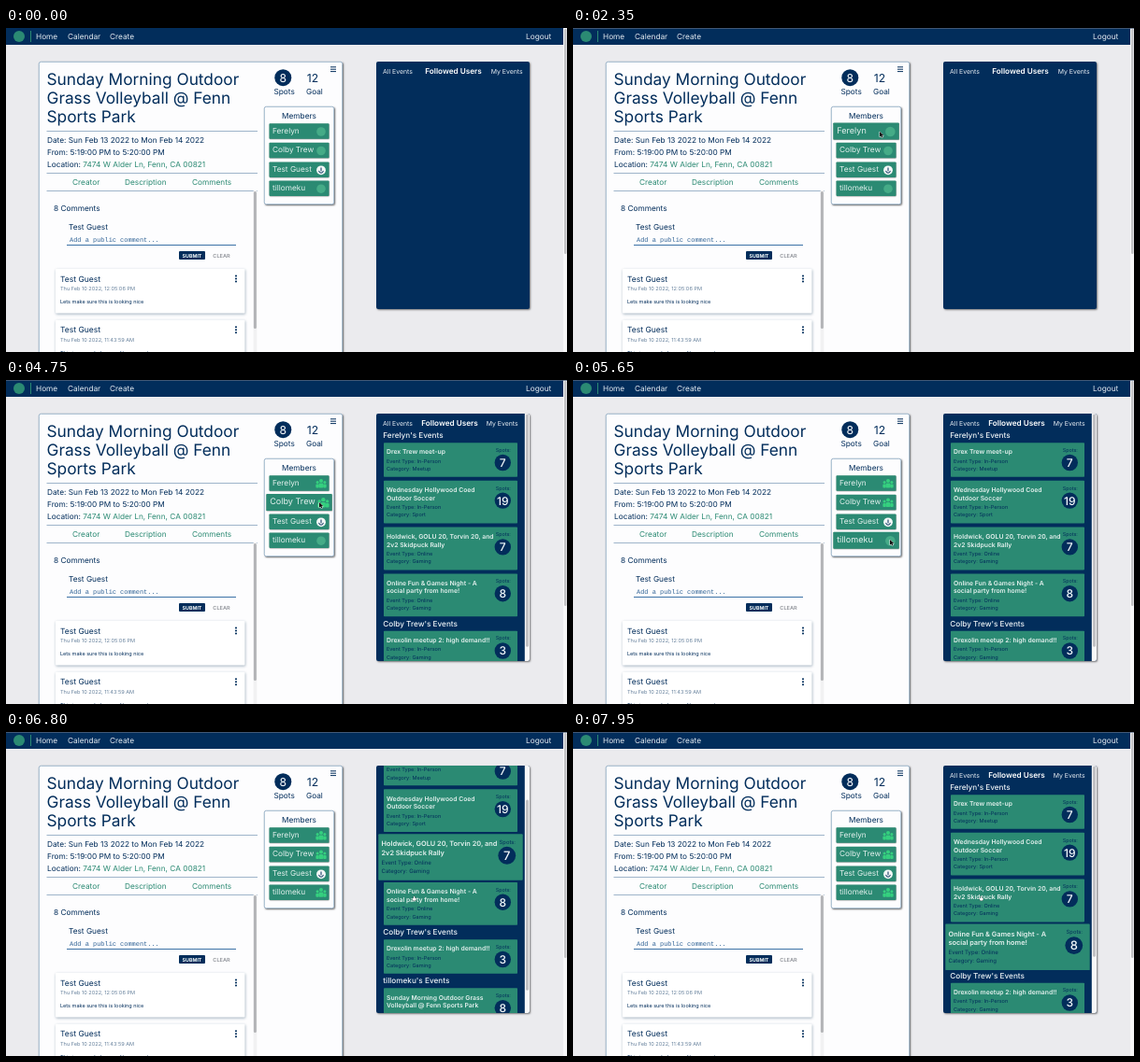
Write an HTML page with a canvas that moves like this. It is 600x347 px and loops after 8 s.

```html
<!DOCTYPE html>
<html lang="en">
<head>
<meta charset="utf-8">
<title>Event page</title>
<style>
html, body { margin: 0; width: 100%; height: 100%; overflow: hidden; background: #ebebee; }
canvas { display: block; width: 600px; height: 347px; }
</style>
</head>
<body>
<canvas id="stage"></canvas>
<script>
const W = 600, H = 347, LOOP = 8000;
const NAVY = '#022d5b', GREEN = '#2b8a73', BRIGHT = '#35d07f', PALE = '#e4f1ee';
const SANS = 'Inter, sans-serif', MONO = '"Liberation Mono", monospace';
const BASE = 8.28, SMALL = 5.57;

const canvas = document.getElementById('stage');
const ctx = canvas.getContext('2d');
const ratio = Math.max(1, window.devicePixelRatio || 1);
canvas.width = W * ratio;
canvas.height = H * ratio;
// Fractional glyph advances keep small text at its true width
ctx.textRendering = 'geometricPrecision';

const members = [
  { name: 'Ferelyn', y: 110.5, followed: 2800 },
  { name: 'Colby Trew', y: 131, followed: 4600 },
  { name: 'Test Guest', y: 151.7, self: true },
  { name: 'tillomeku', y: 171.7, followed: 5850 }
];

const card = (title, type, category, spots) => ({ title, type, category, spots });
const groups = [
  { owner: members[0], cards: [
    card(['Drex Trew meet-up'], 'In-Person', 'Meetup', 7),
    card(['Wednesday Hollywood Coed', 'Outdoor Soccer'], 'In-Person', 'Sport', 19),
    card(['Holdwick, GOLU 20, Torvin 20, and', '2v2 Skidpuck Rally'], 'Online', 'Gaming', 7),
    card(['Online Fun & Games Night - A', 'social party from home!'], 'Online', 'Gaming', 8)
  ] },
  { owner: members[1], cards: [
    card(['Drexolin meetup 2: high demand!!'], 'In-Person', 'Gaming', 3)
  ] },
  { owner: members[3], cards: [
    card(['Sunday Morning Outdoor Grass', 'Volleyball @ Fenn Sports Park'], 'In-Person', 'Sport', 8)
  ] }
];

// Keyframes: time, then values
const pointerPath = [
  [1050, 601, -6], [1650, 430, 78], [2200, 328, 111], [2450, 328, 111],
  [2700, 335, 111], [3000, 335, 111], [3600, 304, 186], [3900, 304, 186],
  [4400, 335, 131], [4850, 335, 131], [5350, 339, 171], [5950, 339, 171], [6350, 436.5, 176]
];
const scrollPath = [[6450, 0], [6800, 46.5], [7050, 77], [7550, 77], [7900, 0]];

function along(keys, t) {
  if (t <= keys[0][0]) return keys[0].slice(1);
  for (let i = 1; i < keys.length; i++) {
    const [a, ...from] = keys[i - 1], [b, ...to] = keys[i];
    if (t < b) {
      const p = (t - a) / (b - a), e = p * p * (3 - 2 * p);
      return from.map((v, k) => v + (to[k] - v) * e);
    }
  }
  return keys[keys.length - 1].slice(1);
}

// y is the middle of the capital letters
function text(str, x, y, size, color, { weight = 400, align = 'left', font = SANS } = {}) {
  ctx.font = `${weight} ${size}px ${font}`;
  ctx.fillStyle = color;
  ctx.textAlign = align;
  ctx.fillText(str, x, y + size * 0.36);
  return ctx.measureText(str).width;
}

function box(x, y, w, h, color, r = 0) {
  ctx.fillStyle = color;
  ctx.beginPath();
  ctx.roundRect(x, y, w, h, r);
  ctx.fill();
}

function disc(x, y, r, color) {
  ctx.fillStyle = color;
  ctx.beginPath();
  ctx.arc(x, y, r, 0, Math.PI * 2);
  ctx.fill();
}

function shadowed(draw, dx, dy, blur, color) {
  ctx.save();
  ctx.shadowColor = color;
  ctx.shadowOffsetX = dx * ratio;
  ctx.shadowOffsetY = dy * ratio;
  ctx.shadowBlur = blur * ratio;
  draw();
  ctx.restore();
}

function frameBox(x, y, w, h) {
  shadowed(() => box(x, y, w, h, '#fdfdfe', 2), 1, 1, 2, 'rgba(0,0,0,.6)');
  ctx.strokeStyle = '#5f86aa';
  ctx.lineWidth = 0.6;
  ctx.beginPath();
  ctx.roundRect(x + 0.3, y + 0.3, w - 0.6, h - 0.6, 2);
  ctx.stroke();
}

function scaled(cx, cy, k, draw) {
  ctx.save();
  ctx.translate(cx, cy);
  ctx.scale(k, k);
  ctx.translate(-cx, -cy);
  draw();
  ctx.restore();
}

function nav(t) {
  box(0, 0, W, 18, NAVY);
  disc(14, 9, 6, GREEN);
  box(26, 3, 1, 12, GREEN);
  text('Home', 32, 9.3, BASE, '#e3e9f0');
  text('Calendar', 66, 9.3, BASE, '#e3e9f0');
  text('Create', 111, 9.3, BASE, '#e3e9f0');
  text('Logout', 556, 9.5, BASE, '#e3e9f0');
  box(596, 0, 4, H, '#f7f7f8');
  box(597, 1, 2.5, 241, '#c1c1c4', 1.2);
  if (t >= 1300) box(0, 0, W, 0.8, '#56677f');
}

function comment(y, date, body) {
  shadowed(() => box(53, y, 202.5, 47.5, '#ffffff', 1), 0.5, 1, 3, 'rgba(20,60,90,.4)');
  text('Test Guest', 58, y + 10.5, 8.5, NAVY);
  text(date, 58, y + 21, SMALL, '#66809c');
  text(body, 58, y + 35, 5.52, NAVY);
  for (let i = -1; i <= 1; i++) disc(246, y + 10.5 + i * 3, 1.05, NAVY);
}

function eventDetails() {
  frameBox(35, 36, 325, 330);
  ['Sunday Morning Outdoor', 'Grass Volleyball @ Fenn', 'Sports Park'].forEach((line, i) =>
    text(line, 43.5, 54.3 + i * 20.2, 17.3, NAVY));

  text('Date: Sun Feb 13 2022 to Mon Feb 14 2022', 44, 120, BASE, NAVY);
  text('From: 5:19:00 PM to 5:20:00 PM', 44, 132.7, BASE, NAVY);
  const w = text('Location: ', 44, 146, BASE, NAVY);
  text('7474 W Alder Ln, Fenn, CA 00821', 44 + w, 146, BASE, GREEN);
  for (const y of [110, 155, 174]) box(43.5, y, 225.5, 0.8, '#7f9db8');
  text('Creator', 71, 164.8, BASE, GREEN);
  text('Description', 127, 164.8, BASE, GREEN);
  text('Comments', 199, 164.8, BASE, GREEN);

  for (const y of [41.3, 43.7, 46.1]) box(347, y, 6, 1, NAVY);
  disc(296.3, 53.2, 9, NAVY);
  text('8', 296.3, 53.3, 12.2, '#ffffff', { align: 'center' });
  text('12', 321.7, 53.3, 12.2, NAVY);
  text('Spots', 286.5, 68.2, BASE, NAVY);
  text('Goal', 321, 68.2, BASE, NAVY);

  text('8 Comments', 51, 193, BASE, NAVY);
  text('Test Guest', 67, 213, BASE, NAVY);
  text('Add a public comment...', 68, 226.5, 6.95, '#2f6295', { font: MONO });
  box(65, 232, 181, 0.9, '#3c72a6');
  box(185, 239, 28, 9, NAVY, 1);
  text('SUBMIT', 199, 243.6, 5.3, '#ffffff', { weight: 700, align: 'center' });
  text('CLEAR', 230.5, 243.6, 5.6, '#8f9298', { weight: 600, align: 'center' });
  comment(258, 'Thu Feb 10 2022, 12:05:06 PM', 'Lets make sure this is looking nice');
  comment(312.7, 'Thu Feb 10 2022, 11:43:59 AM', 'This is gonna help me edit comments');
  box(264.7, 174, 3.6, 173, '#f1f1f2');
  box(264.9, 175, 3, 147, '#b3b4b7', 1.5);
}

function followIcon(x, y) {
  for (const [dx, dy, r] of [[-3.9, -1, 1.5], [3.9, -1, 1.5], [0, -2.6, 2]]) {
    disc(x + dx, y + dy, r, BRIGHT);
    box(x + dx - r * 1.15, y + dy + r + 0.5, r * 2.3, 4.6 - dy - r, BRIGHT, 1);
  }
}

function selfIcon(x, y) {
  disc(x, y, 4.9, '#f4f8f7');
  ctx.strokeStyle = NAVY;
  ctx.lineWidth = 1;
  ctx.beginPath();
  ctx.arc(x, y + 0.6, 2.3, 0, Math.PI);
  ctx.moveTo(x, y - 2.8);
  ctx.lineTo(x, y + 1);
  ctx.stroke();
}

function memberList(t, [px, py]) {
  frameBox(276, 84, 75, 105);
  text('Members', 313.5, 94.3, BASE, NAVY, { align: 'center' });
  for (const m of members) {
    const over = px > 281 && px < 346 && Math.abs(py - m.y) < 8.5;
    scaled(313.5, m.y, over ? 1.1 : 1, () => {
      shadowed(() => box(281.5, m.y - 8.2, 64, 16.4, GREEN, 0.8), 0.3, 0.5, 1, 'rgba(0,0,0,.4)');
      text(m.name, 285, m.y - 0.9, BASE, PALE);
      if (m.self) selfIcon(337, m.y + 0.6);
      else if (t >= m.followed) followIcon(337, m.y);
      else disc(337, m.y + 0.5, 4.8, '#45ab87');
    });
  }
}

function layout(t) {
  const heads = [], cards = [];
  let y = 51.7;
  for (const g of groups) {
    if (t < g.owner.followed) continue;
    heads.push({ label: `${g.owner.name}'s Events`, y: y + 7.7 });
    y += 15.5;
    g.cards.forEach((c, i) => {
      if (i) y += 4;
      const h = c.title.length > 1 ? 45.8 : 36.6;
      cards.push({ ...c, y, h });
      y += h;
    });
  }
  return { heads, cards, height: y + 11.4 - 36 };
}

function eventCard(c, right) {
  box(404, c.y, right - 404, c.h, GREEN, 0.8);
  let y = c.y + 9.8;
  for (const line of c.title) {
    text(line, 407, y, 6.8, PALE, { weight: 600 });
    y += 8.7;
  }
  text(`Event Type: ${c.type}`, 407, y + 1, SMALL, NAVY);
  text(`Category: ${c.category}`, 407, y + 9.4, SMALL, NAVY);
  const cx = right - 15.7;
  text('Spots:', cx + 0.5, c.y + 7.8, 5.4, NAVY, { align: 'center' });
  disc(cx, c.y + 21.3, 8.7, NAVY);
  text(String(c.spots), cx, c.y + 21.4, 12, '#f4f8fa', { weight: 500, align: 'center' });
}

function eventPanel(t) {
  const view = 265, { heads, cards, height } = layout(t);
  const overflow = height > view, right = overflow ? 547 : 552;
  const [scroll] = along(scrollPath, t);
  // Hover only refreshes once scrolling has settled
  const hovered = t >= 7150 ? cards[3] : t >= 6240 ? cards[2] : null;

  shadowed(() => box(396, 36, 164, view, NAVY, 2), 1, 1, 2, 'rgba(0,0,0,.5)');
  ctx.save();
  ctx.beginPath();
  ctx.roundRect(396, 36, 164, view, 2);
  ctx.clip();
  ctx.translate(0, -scroll);
  text('All Events', 403, 46.3, 6.9, '#e8edf3');
  text('Followed Users', overflow ? 474.5 : 478.5, 46.3, 8.2, '#ffffff', { weight: 600, align: 'center' });
  text('My Events', right + 0.6, 46.3, 6.9, '#e8edf3', { align: 'right' });
  for (const h of heads) text(h.label, 403.3, h.y, 8.2, '#f0f4f7', { weight: 500 });
  for (const c of cards) if (c !== hovered) eventCard(c, right);
  if (hovered) {
    scaled((404 + right) / 2, hovered.y + hovered.h / 2, 1.08, () => eventCard(hovered, right));
  }
  ctx.translate(0, scroll);
  if (overflow) {
    const k = view / height;
    box(554.8, 36, 5.2, view, '#f7f7f8');
    box(556, 36.5 + scroll * k, 3, view * k - 1, '#c1c1c4', 1.5);
  }
  ctx.restore();
}

function pointer([x, y], hand) {
  ctx.save();
  ctx.translate(x, y);
  ctx.lineJoin = 'round';
  ctx.beginPath();
  if (hand) {
    ctx.roundRect(-0.6, 0, 1.3, 3, 0.6);
    ctx.roundRect(-1.5, 1.8, 3.6, 2.8, 1);
    ctx.lineWidth = 0.6;
    ctx.strokeStyle = '#333';
    ctx.fillStyle = '#fff';
  } else {
    [[0, 0], [0, 5.8], [1.4, 4.6], [2.3, 6.6], [3.3, 6.1], [2.4, 4.2], [4.2, 4.1]]
      .forEach(([a, b]) => ctx.lineTo(a, b));
    ctx.closePath();
    ctx.lineWidth = 0.9;
    ctx.strokeStyle = '#fff';
    ctx.fillStyle = '#111';
  }
  ctx.stroke();
  ctx.fill();
  ctx.restore();
}

function draw(t) {
  const at = along(pointerPath, t);
  ctx.setTransform(ratio, 0, 0, ratio, 0, 0);
  box(0, 0, W, H, '#ebebee');
  eventDetails();
  memberList(t, at);
  eventPanel(t);
  nav(t);
  if (t > pointerPath[0][0]) pointer(at, t >= 6240);
}

const start = performance.now();
function tick() {
  draw((performance.now() - start) % LOOP);
  requestAnimationFrame(tick);
}
tick();
</script>
</body>
</html>
```
